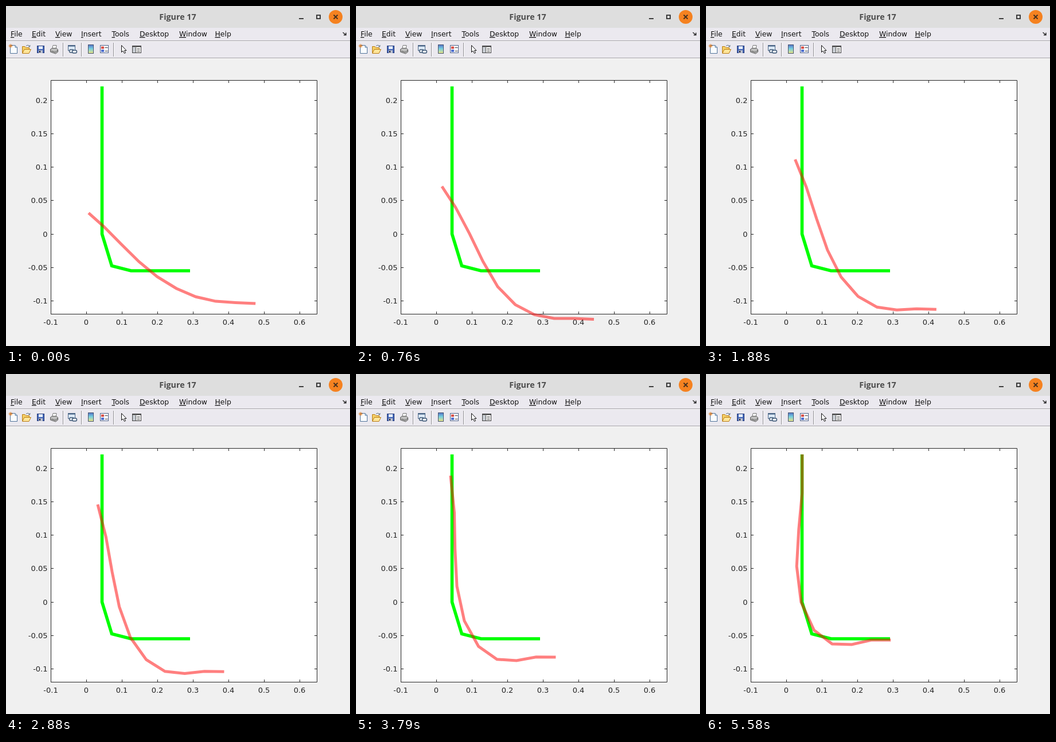
These frames come from a looping animation (600x592 px, 6 s). An HTML page:

```html
<!DOCTYPE html>
<html lang="en">
<head>
<meta charset="utf-8">
<title>Figure 17</title>
<style>
  html, body { margin: 0; width: 100%; height: 100%; overflow: hidden; background: #f0f0f0; }
  svg { display: block; width: 600px; height: 592px; }
  text { font-family: "DejaVu Sans", Verdana, sans-serif; }
  .title { font: bold 14.3px "Open Sans", "Noto Sans", sans-serif; fill: #4c4c4c; text-anchor: middle; }
  .menu text { font-size: 12.4px; fill: #111; }
  .ticks text { font-size: 13px; fill: #262626; }
  .ticks path { stroke: #262626; fill: none; }
</style>
</head>
<body>
<svg viewBox="0 0 600 592">
  <rect width="600" height="592" fill="#f0f0f0"/>
  <rect width="600" height="38" fill="#dedede"/>
  <rect y="38" width="600" height="53" fill="#ebe9ef"/>
  <path d="M0 60.5H600M0 90.5H600" stroke="#a3a2a6"/>
  <path d="M0 61.5H600M0 91.5H600" stroke="#fafafa"/>

  <text class="title" x="299.5" y="24">Figure 17</text>
  <path d="M511 22H519" stroke="#3f3f3f" stroke-width="2"/>
  <rect x="542" y="16" width="6" height="6" fill="none" stroke="#3f3f3f" stroke-width="2"/>
  <circle cx="575" cy="19" r="12" fill="#f58220"/>
  <path d="M571.5 15.5l7 7m0-7l-7 7" stroke="#45301f" stroke-width="1.8"/>

  <g class="menu" id="menu"></g>
  <path d="M587.5 46l4.500 3.500M593 46.500v4h-4" stroke="#222" stroke-width="1.4" fill="none"/>

  <g>
    <path d="M99.5 64V88M131.5 64V88M187.5 64V88" stroke="#8f8e93"/>
    <path d="M100.5 64V88M132.5 64V88M188.5 64V88" stroke="#fff"/>
    <!-- new -->
    <path d="M7.5 68.5H16l3.500 3.500V82.5H7.5Z" fill="#fafdff" stroke="#52749a"/>
    <path d="M16 68.5V72H19.5" fill="#c5d9ed" stroke="#52749a"/>
    <path d="M8 66v7M4.5 69.5h7M5.5 67l5 5m0-5l-5 5" stroke="#e08028"/>
    <!-- open -->
    <path d="M28.5 81.5V70.5H33l2 2H40.5V75" fill="#f5cf66" stroke="#b87b16"/>
    <path d="M28.5 82.5L32 75.5H43.5L40 82.5Z" fill="#ffe69a" stroke="#b87b16"/>
    <path d="M35 69.5q4-3 6 1m-2-.5l2.500 1 .5-3" fill="none" stroke="#5b6f83"/>
    <!-- save -->
    <rect x="54.5" y="69.5" width="12" height="12" fill="#4264b5" stroke="#263c7c"/>
    <path d="M57 70h7v5h-7z" fill="#e5eefb"/>
    <path d="M57 77h7v5h-7z" fill="#b8bdcc"/>
    <path d="M58 78h2v3h-2z" fill="#223"/>
    <!-- print -->
    <path d="M80.5 75L82 68.5h6L87 75" fill="#fff" stroke="#777"/>
    <path d="M77.5 75.5l3-2H88l2.500 2.500v4l-4 3-9-3Z" fill="#bdbdbd" stroke="#555"/>
    <path d="M79 78.5l7 2 4-3" fill="none" stroke="#555"/>
    <!-- link -->
    <rect x="108.5" y="68.5" width="12" height="9" fill="#dce9f7" stroke="#4b6587"/>
    <path d="M109 69.5H120" stroke="#4b6587" stroke-width="2"/>
    <g fill="#eef2f7" stroke="#405a78" stroke-width="1.4">
      <rect x="110.5" y="76" width="8" height="5" rx="2.5"/>
      <rect x="115.5" y="77" width="8" height="5" rx="2.5"/>
    </g>
    <!-- colorbar -->
    <linearGradient id="bar" x2="0" y2="1">
      <stop stop-color="#5470c6"/><stop offset=".45" stop-color="#74cfe0"/><stop offset="1" stop-color="#f0e482"/>
    </linearGradient>
    <rect x="143.5" y="67.5" width="9" height="15" fill="url(#bar)" stroke="#48566f"/>
    <!-- legend -->
    <rect x="164.5" y="68.5" width="14" height="13" fill="#fafaff" stroke="#51648a"/>
    <path d="M166 70.5h5v4h-5z" fill="#d94c43"/>
    <path d="M166 76h5v4h-5z" fill="#4d6ed0"/>
    <path d="M172.5 72.5h5M172.5 78.5h5" stroke="#444"/>
    <!-- pointer -->
    <path d="M201.5 68.5V80.5L204 78L206.5 82.5L208.5 81.5L206.5 77.5H210Z" fill="#fff" stroke="#111"/>
    <!-- inspector -->
    <rect x="220.5" y="69.5" width="15" height="12" fill="#fff" stroke="#444"/>
    <path d="M220 70.5H236" stroke="#444" stroke-width="2"/>
    <path d="M221 72h5v9h-5z" fill="#c7ccd2"/>
    <path d="M226.5 72V81M228.5 74.5h5M228.5 77h5M228.5 79.5h5" stroke="#555"/>
  </g>

  <rect x="78.5" y="129.5" width="464" height="407" fill="#fff"/>
  <g class="ticks" id="ticks"></g>
  <g fill="none" stroke-miterlimit="10">
    <path d="M167.5 140V397L184.5 452.5L218 461H321" stroke="#0f0" stroke-width="5.6"/>
    <polyline id="chain" stroke="#f00" stroke-opacity=".5" stroke-width="5"/>
  </g>
</svg>
<script>
const NS = "http://www.w3.org/2000/svg";
const $ = id => document.getElementById(id);

function add(parent, tag, attrs, text = "") {
  const el = document.createElementNS(NS, tag);
  for (const key in attrs) el.setAttribute(key, attrs[key]);
  el.textContent = text;
  parent.append(el);
  return el;
}

const menu = { File: 8, Edit: 45, View: 86, Insert: 131, Tools: 184.5, Desktop: 233, Window: 302, Help: 364.5 };
for (const [label, x] of Object.entries(menu)) {
  const item = add($("menu"), "text", { x, y: 53 });
  add(item, "tspan", { "text-decoration": "underline" }, label[0]);
  item.append(label.slice(1));
}

let tickPath = "M78.5 129.5H542.5V536.5H78.5Z";
for (let i = 0; i < 8; i++) {
  const x = 78.5 + i * 62;
  tickPath += `M${x} 536.5v-4.5M${x} 129.5v4.5`;
  add($("ticks"), "text", { x: x - 0.5, y: 555, "text-anchor": "middle" }, String((i - 1) / 10));
}
for (let i = -2; i <= 4; i++) {
  const y = Math.floor(397 - i * 58.15) + 0.5;
  tickPath += `M78.5 ${y}h4.5M542.5 ${y}h-4.5`;
  add($("ticks"), "text", { x: 72.5, y: y + 4.5, "text-anchor": "end" }, String(i * 5 / 100));
}
add($("ticks"), "path", { d: tickPath });

// Pixels per axis unit
const SCALE_X = 620, SCALE_Y = 1166;
// Downward heading of each link in degrees once the chain has settled
const settled = [90, 100, 96, 77, 49, 22, 1, -7, 0];
// [time in ms, distance left for the upper end to rise, 1 to 0]
const rise = [[0, 1], [760, .79], [850, .79], [1880, .577], [2450, .395], [2880, .395], [3790, .168], [4390, .059], [5060, 0], [6000, 0]];

const bell = (v, center, width) => Math.exp(-(((v - center) / width) ** 2));

function remaining(time) {
  const next = rise.findIndex(([at]) => at > time);
  const [t0, a] = rise[next - 1], [t1, b] = rise[next];
  return a + (b - a) * (time - t0) / (t1 - t0);
}

// The chain straightens as a whole, sags near its far end and ripples early on
function chainPoints(left) {
  let x = 167.7 - 23.7 * left ** 1.2, y = 140 + 220.5 * left;
  const points = [[x, y]];
  settled.forEach((angle, i) => {
    const sag = 7 * left * bell(i, 5.5, 2);
    const ripple = 8 * bell(left, .79, .13) * bell(i, 2.8, 1.5);
    const heading = (angle * (1 - .72 * left) + sag + ripple) * Math.PI / 180;
    const length = i ? .0551 + .0011 * left : .058 - .011 * left;
    x += SCALE_X * length * Math.cos(heading);
    y += SCALE_Y * length * Math.sin(heading);
    points.push([x, y]);
  });
  return points;
}

function render(time) {
  $("chain").setAttribute("points", chainPoints(remaining(time)).join(" "));
}

const start = performance.now();
function tick() {
  render((performance.now() - start) % 6000);
  requestAnimationFrame(tick);
}
tick();
</script>
</body>
</html>
```
